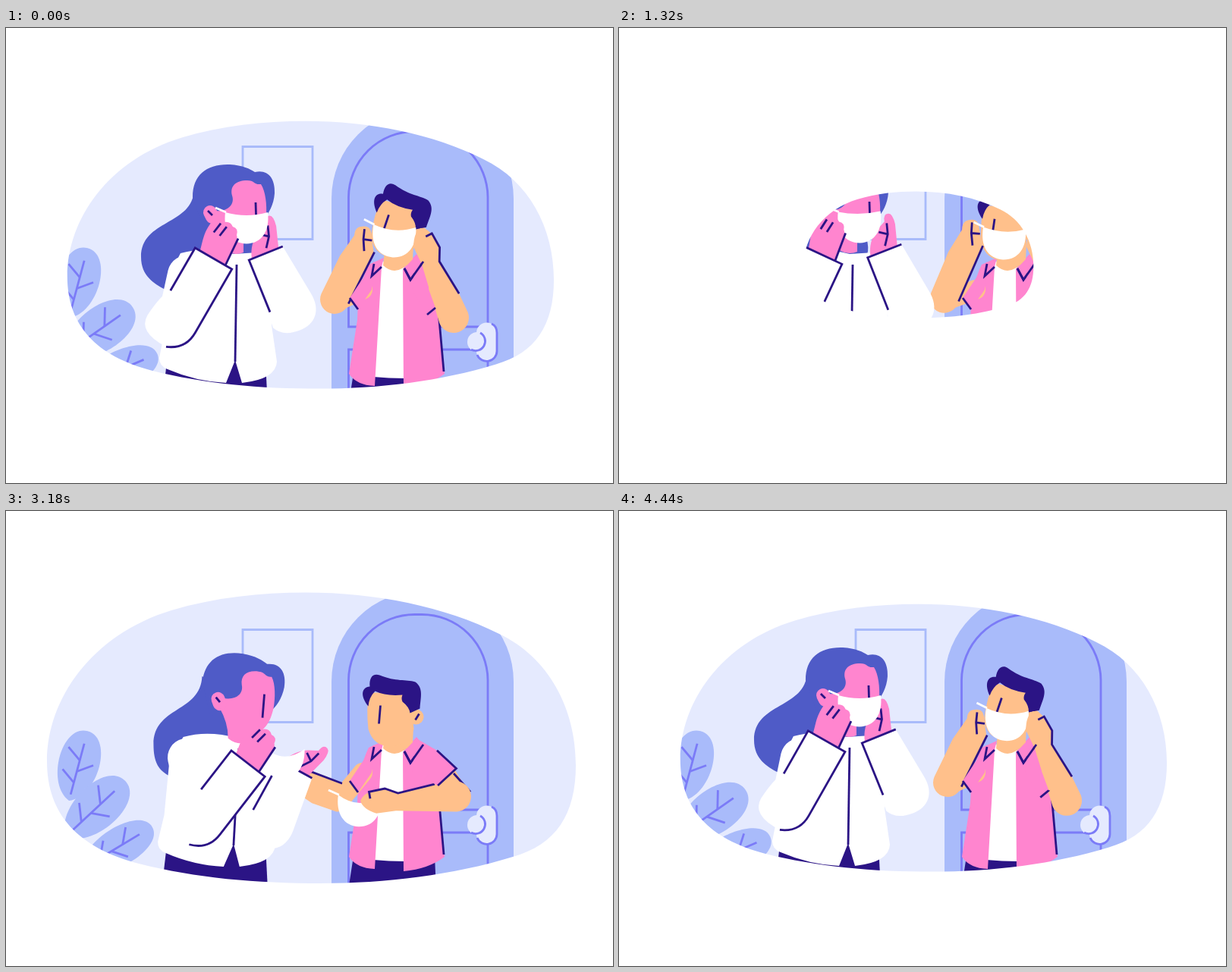
Animation, 800 px wide and 600 px high, one loop 4500 ms. Source, as an HTML page with a canvas:

```html
<!DOCTYPE html>
<html lang="en">
<head>
<meta charset="utf-8">
<title>Putting masks on</title>
<style>
html, body { margin: 0; width: 100%; height: 100%; overflow: hidden; background: #fff; }
canvas { display: block; width: 800px; height: 600px; }
</style>
</head>
<body>
<canvas id="stage" width="800" height="600"></canvas>
<script>
const ctx = document.getElementById('stage').getContext('2d');
const LOOP = 4500;
const PALE = '#e5eafe', SOFT = '#a9bbfa', EDGE = '#7b7bf7', HAIR = '#4f5bc7',
  PINK = '#ff85cf', DARK = '#2b1485', SKIN = '#ffc08b', WHITE = '#fff';

const mix = (a, b, k) => a + (b - a) * k;
const rad = deg => deg * Math.PI / 180;
const cubic = k => k < .5 ? 4 * k ** 3 : 1 - 4 * (1 - k) ** 3;
const smooth = k => k * k * (3 - 2 * k);

// Steps are [time, value]; values ease from one to the next.
function track(steps, t, ease) {
  const i = steps.findIndex(s => t < s[0]);
  if (i === 0) return steps[0][1];
  if (i < 0) return steps[steps.length - 1][1];
  const [t0, a] = steps[i - 1], [t1, b] = steps[i];
  return mix(a, b, ease((t - t0) / (t1 - t0)));
}

const SIZE = [[60, .92], [780, 1], [840, 1], [1760, 0], [2160, 0], [3160, 1], [3300, 1], [4000, .92]];
const POSE = [[2820, 0], [3540, 1], [4500, 2], [5340, 3]];

// A joint has one set of values (x, y, angle, extra) per pose:
// hand over, lift, fit, settle.
const joint = (...poses) => pose => {
  const i = Math.floor(pose), next = poses[Math.min(i + 1, 3)];
  return poses[i].map((v, n) => mix(v, next[n], pose - i));
};

const rig = {
  head: joint([295, 257, 13], [266, 239, 0], [270, 243, 0], [271, 242, 0]),
  bulge: joint([212, 315], [177, 300], [178, 302], [193, 305]),
  tip: joint([220, 351], [213, 349], [210, 345], [207, 337]),
  coat: joint([0, 5, -.13], [-1, -3, .05], [0, 0, 0], [4, 0, 0]),
  nearArm: joint([355, 390.5, 84], [283.5, 276, -8], [273.5, 304, 30], [268.5, 299.5, 25]),
  farArm: joint([422, 395, 85], [343, 287, -27], [342.5, 297, -22], [350, 294, -21.5]),
  mask: joint([412, 405, 10, 22], [316, 258, 1, -12], [317, 263, 0, -12], [317, 262, -1, -14]),
  hisHead: joint([515, 305, 0], [514, 306, 0], [513, 299, 14], [513, 302, 3.5]),
  hisMask: joint([463, 449, 2, 5], [468, 341, 0, -4], [511, 281, 4, -9], [507, 284, 3, -11]),
  leftArm: joint([447, 390, 114, .52], [432, 366, 274, .67], [433, 358, 293, 1], [429, 356, 290, 1.05]),
  rightArm: joint([589, 383, 154], [597, 370, 199], [590, 382, 249], [590, 382, 249]),
  hemOut: joint([594, 348, 1], [593, 331, 1], [566, 369, 0], [566, 369, 0]),
  hemIn: joint([555, 380], [583, 344], [555, 378], [555, 378]),
  sway: joint([6, 0, 0], [0, 0, 0], [3, 8, 8], [10, 1, 6])
};

function fill(color, d) {
  ctx.fillStyle = color;
  ctx.fill(new Path2D(d));
}

function ink(d, color = DARK, width = 2.8) {
  ctx.strokeStyle = color;
  ctx.lineWidth = width;
  ctx.stroke(new Path2D(d));
}

function limb(color, width, d) {
  ctx.lineCap = 'round';
  ink(d, color, width);
  ctx.lineCap = 'butt';
}

function local([x, y, angle = 0, extra], paint) {
  ctx.save();
  ctx.translate(x, y);
  ctx.rotate(rad(angle));
  paint(extra);
  ctx.restore();
}

const window0 = new Path2D('M54 330C54 248 113 163 218 131C275 114 335 107.5 395 107.5C488 107.5 578 126 650 162C715 193 751 260 751 335C751 400 725 440 668 456C590 480 500 491 415 491C330 491 250 484 175 465C95 444 54 400 54 330Z');

function room() {
  ctx.fillStyle = PALE;
  ctx.fillRect(0, 0, 800, 600);
  ink('M312 156.5H404V278.5H312Z', SOFT);
  fill(SOFT, 'M429 500V225A120 120 0 0 1 669 225V500Z');
  ink('M451.5 394V223A87 87 0 0 1 538.5 136.5H548A87 87 0 0 1 635 223V394Z', EDGE);
  ink('M451.5 500V424H635V500', EDGE);
  limb(PALE, 27, 'M633.5 402V426');
  ink('M640 390Q647 393 647 402V426A13.5 13.5 0 0 1 621 431', EDGE);
  limb(PALE, 26, 'M621 414h.01');
  ink('M625 402A12.5 12.5 0 0 1 613 424', EDGE);
}

function leaf(x, y, angle, len, half) {
  local([x, y, angle], () => {
    const w = half * 1.33;
    fill(SOFT, `M0 0C${-w} ${-len * .15} ${-w} ${-len} 0 ${-len}C${w} ${-len} ${w} ${-len * .15} 0 0`);
    ink(`M0 ${-len * .09}V${-len * .82}`, EDGE);
    [.26, .42, .58].forEach((at, i) => {
      const side = i % 2 ? 1 : -1;
      ink(`M0 ${-len * at}L${side * half * .7} ${-len * (at + .14)}`, EDGE);
    });
  });
}

function plant(pose) {
  const [a, b, c] = rig.sway(pose);
  leaf(83, 382, 12 + a, 95, 27);
  leaf(79, 429, 47 + b, 107, 29);
  leaf(100, 472, 59 + c, 108, 25);
}

function mask(at) {
  local(at, dip => {
    ink('M-27 -20L-41 -26', WHITE);
    fill(WHITE, `M-28 -20Q0 ${dip} 28 -20C31 5 20 21 0 21.500C-20 21 -31 5 -28 -20`);
  });
}

function hisHead() {
  fill(SKIN, 'M-36 -66H8L20 -45 23 -18Q16 3 -5 5Q-30 6 -37 -18Q-40 -45 -36 -66');
  limb(SKIN, 20, 'M26 -34h.01');
  fill(DARK, 'M-37 -48C-48 -62 -46 -73 -35 -74C-36 -86 -31 -92 -22 -89C0 -80 12 -84 25 -80C36 -72 32 -60 31 -45L18 -39Q17 -47 8 -54Q6 -58 8 -63Q-14 -61 -28 -68Q-36 -60 -37 -48');
  ink('M25 -30L30 -38M-21 -49L-23 -25');
}

function leftArm(reach) {
  ctx.scale(reach, 1);
  fill(SKIN, 'M0 19A19 19 0 0 1 0 -19L56 -16 88 -9Q99 -13 103 -4Q108 5 100 10L88 17 76 24Z');
  ink('M2 19L78 24M101 0L88 4 74 11M88 4L91 15');
}

function rightArm() {
  fill(SKIN, 'M0 20A20 20 0 0 1 0 -20L80 -14 106 -16Q124 -9 126 2Q122 10 114 12L93 16 76 9 27 18Z');
  ink('M27 18L76 9 93 16 114 13 113 4');
}

function man(pose) {
  fill(DARK, 'M458 455H565L567 500H451Z');
  fill(WHITE, 'M495 308H524L526 462Q505 462 484 460Z');
  fill(PINK, 'M498 303L478 312Q464 340 463 385L452 456Q462 471 486 472L495 315Z');
  fill(PINK, 'M523 318L541 298Q566 325 570 374L578 456Q557 472 524 475Z');
  ink('M570 374L577 453');
  fill(SKIN, 'M499 295L537 285 536 305Q515 330 497 313Z');
  local(rig.hisHead(pose), hisHead);

  const left = rig.leftArm(pose);
  limb(SKIN, 26, `M470 345L${left[0]} ${left[1] + 4}`);
  local(left, leftArm);
  fill(PINK, 'M485 308L453 356 464 371 482 345Z');
  ink('M453 356L464 371M485 311L482 327 495 315M525 317L533 332 550 308');
  mask(rig.hisMask(pose));

  const right = rig.rightArm(pose);
  const [ox, oy, ridge] = rig.hemOut(pose), [ix, iy] = rig.hemIn(pose);
  limb(SKIN, 34, `M574 345L${right[0]} ${right[1]}`);
  // The outer edge of the upper arm shows while the arm hangs.
  ink(`M590 346L${mix(590, right[0] + 19, ridge)} ${mix(346, right[1] - 6, ridge)}`);
  local(right, rightArm);
  const rx = mix(ox, 568, ridge), ry = mix(oy, (oy + 300) / 2 - 4, ridge);
  fill(PINK, `M541 300L${rx} ${ry} ${ox} ${oy} ${ix} ${iy} 535 345Z`);
  ink(`M${rx} ${ry}L${ox} ${oy} ${ix} ${iy}`);
  ink('M525 317L533 332 550 308');
}

function herHead() {
  fill(HAIR, 'M-24 -20C-24 -50 -5 -64 25 -63C42 -62 52 -57 58 -53C75 -57 85 -45 84 -25C83 -10 76 2 70 8L20 40L-10 20Z');
  fill(PINK, 'M4 -2C22 0 32 -10 28 -22C25 -34 32 -42 48 -42C58 -42 56 -36 66 -37C72 -28 74 -10 73 4C70 30 60 40 43 40V53Q30 58 18 50Q16 30 2 11Z');
  limb(PINK, 18, 'M-1 0L2 6');
  ink('M-4 -2L2 4M59 -13L60 18');
}

function hairTail(pose) {
  const [x, y] = rig.head(pose), [bx, by] = rig.bulge(pose), [tx, ty] = rig.tip(pose);
  fill(HAIR, `M${x - 22} ${y - 30}C${x - 24} ${y + 18} ${bx} ${by - 50} ${bx} ${by}
    C${bx} ${by + 25} ${tx - 15} ${ty - 8} ${tx} ${ty}L${tx + 25} ${ty - 42}
    L${x + 30} ${y + 62}L${x + 56} ${y + 57}Q${x + 62} ${y + 40} ${x + 40} ${y}Z`);
}

function coat(pose) {
  const [dx, dy, lean] = rig.coat(pose);
  ctx.save();
  ctx.transform(1, 0, lean, 1, dx - lean * 400, dy);
  fill(WHITE, 'M230 297Q262 288 300 298L332 296Q350 325 350 392L357 440Q356 463 311 468L302 438 290 468Q250 466 213 450Q202 446 202 435L209 400 213 330Z');
  ink('M304 312L302 440');
  ctx.restore();
}

function farSleeve() {
  fill(WHITE, 'M-24 0H24L35 70C40 98 24 111 5 111Q-20 111 -28 95Z');
  ink('M-24 74V0H24');
}

function farHand() {
  fill(PINK, 'M-20 0Q-15 -20 2 -30L14 -36Q16 -47 23 -44Q28 -42 26 -28L18 0Z');
  ink('M16 -33L12 -19 3 -6M2 -26L12 -19');
}

function nearSleeve() {
  fill(WHITE, 'M-28 0H28V97Q28 122 4 132Q-38 134 -38 108Q-36 75 -28 65Z');
  ink('M-28 65V0H28V97Q28 122 4 132');
}

function nearHand() {
  fill(PINK, 'M-20 2C-24 -15 -29 -22 -26 -44Q-20 -52 -14 -46Q-7 -55 1 -49Q9 -51 11 -42Q18 -38 18 2Z');
  ink('M-15 -45L-17 -30M-6 -45L-8 -30M18 0L15 -39');
}

function woman(pose) {
  const near = rig.nearArm(pose), far = rig.farArm(pose), turn = rad(near[2]);
  hairTail(pose);
  fill(DARK, 'M212 440H342L345 500H205Z');
  coat(pose);
  local(rig.head(pose), herHead);
  local(far, farHand);
  local(far, farSleeve);
  mask(rig.mask(pose));
  limb(WHITE, 50, `M238 325L${near[0] - Math.sin(turn) * 100} ${near[1] + Math.cos(turn) * 100}`);
  local(near, nearHand);
  local(near, nearSleeve);
}

function render(t) {
  ctx.clearRect(0, 0, 800, 600);
  const size = track(SIZE, t, cubic);
  if (size <= 0) return;
  const pose = track(POSE, t < 2000 ? t + LOOP : t, smooth);

  room();
  plant(pose);
  man(pose);
  woman(pose);

  ctx.save();
  ctx.globalCompositeOperation = 'destination-in';
  ctx.translate(389, 298.5);
  ctx.scale(size, size);
  ctx.translate(-389, -298.5);
  ctx.fillStyle = WHITE;
  ctx.fill(window0);
  ctx.restore();
}

const start = performance.now();
function tick() {
  render((performance.now() - start) % LOOP);
  requestAnimationFrame(tick);
}
tick();
</script>
</body>
</html>
```
